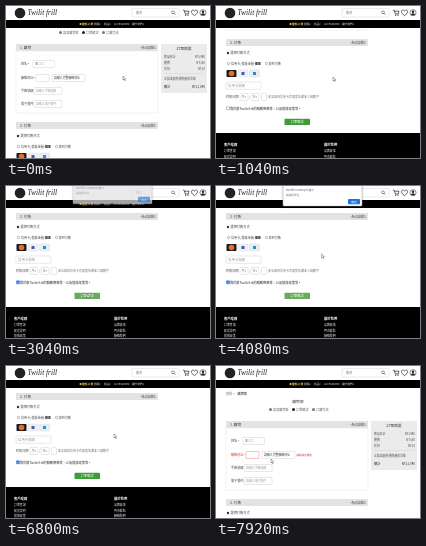
An HTML page with a canvas that plays this animation: 204 by 152 pixels, repeating every 8000 ms.

```html
<!DOCTYPE html>
<html lang="zh-Hant">
<head>
<meta charset="utf-8">
<title>Checkout</title>
<style>
html, body { margin: 0; width: 100%; height: 100%; overflow: hidden; background: #fff; }
canvas { display: block; width: 204px; height: 152px; }
</style>
</head>
<body>
<canvas id="stage"></canvas>
<script>
const W = 204, H = 152, LOOP = 8000;
const SANS = '"Noto Sans CJK TC", "Noto Sans CJK", "Noto Sans", sans-serif';
const SERIF = '"Liberation Serif", "Noto Serif", serif';
const BRAND = 'Twilit frill';
const canvas = document.getElementById('stage');
const ctx = canvas.getContext('2d');
const ratio = window.devicePixelRatio || 1;
canvas.width = W * ratio;
canvas.height = H * ratio;

// Scroll holds each value until the next time.
const scrollSteps = [
  [0, 17], [240, 25], [400, 45], [560, 71], [720, 73], [880, 84], [1040, 100],
  [1200, 106], [6880, 70], [6960, 25], [7040, 4], [7200, 1], [7360, 0]
];
const cursorPath = [
  [0, 117, 70], [1280, 117, 71], [1600, 66, 95], [1840, 36, 118], [2080, 14, 97],
  [2160, 13, 96], [2560, 81, 108], [3680, 81, 108], [4560, 138, 15],
  [4640, 137, 15], [5200, 86, 3], [5520, 84, 4], [5600, 86, 5], [6160, 138, 15],
  [6400, 137, 18], [6800, 108, 68], [7280, 108, 70], [7840, 55, 93], [8000, 55, 93]
];

function held(steps, t) {
  let value = steps[0][1];
  for (const [time, v] of steps) if (t >= time) value = v;
  return value;
}

function along(path, t) {
  let i = 1;
  while (i < path.length - 1 && path[i][0] < t) i++;
  const [t0, x0, y0] = path[i - 1], [t1, x1, y1] = path[i];
  const u = Math.min(1, Math.max(0, (t - t0) / (t1 - t0)));
  const e = u * u * (3 - 2 * u);
  return [x0 + (x1 - x0) * e, y0 + (y1 - y0) * e];
}

const ramp = (t, from, to) => Math.min(1, Math.max(0, (t - from) / (to - from)));

function dialogOpacity(t) {
  if (t < 3040) return 0;
  if (t >= 6160) return 1 - ramp(t, 6160, 6400);
  return 1 - (1 - ramp(t, 2880, 3280)) ** 2;
}

function rect(x, y, w, h, fill) {
  ctx.fillStyle = fill;
  ctx.fillRect(x, y, w, h);
}

function box(x, y, w, h, stroke = '#d0d0d0', fill = '#fff', radius = 0.7, line = 0.5) {
  ctx.beginPath();
  ctx.roundRect(x, y, w, h, radius);
  ctx.fillStyle = fill;
  ctx.fill();
  if (stroke) {
    ctx.strokeStyle = stroke;
    ctx.lineWidth = line;
    ctx.stroke();
  }
}

function circle(x, y, r, fill, stroke) {
  ctx.beginPath();
  ctx.arc(x, y, r, 0, Math.PI * 2);
  if (fill) { ctx.fillStyle = fill; ctx.fill(); }
  if (stroke) { ctx.strokeStyle = stroke; ctx.lineWidth = 0.5; ctx.stroke(); }
}

function text(str, x, y, size = 3.4, color = '#444', align = 'left', weight = 400) {
  ctx.font = `${weight} ${size}px ${SANS}`;
  ctx.fillStyle = color;
  ctx.textAlign = align;
  ctx.textBaseline = 'middle';
  ctx.fillText(str, x, y);
}

function stroke(points, color = '#222', width = 0.7) {
  ctx.beginPath();
  points.forEach(([x, y], i) => i ? ctx.lineTo(x, y) : ctx.moveTo(x, y));
  ctx.strokeStyle = color;
  ctx.lineWidth = width;
  ctx.stroke();
}

function sectionBar(title, y) {
  rect(10, y, 142, 7, '#e3e3e3');
  text(title, 14, y + 3.5, 3.6, '#444');
  text('*為必填欄位', 150, y + 3.5, 2.9, '#444', 'right');
}

function field(label, y, x, w, value, color) {
  text(label, 15, y, 3.1);
  box(x, y - 3.5, w, 7);
  text(value, x + 2, y, 2.9, color);
}

function drawSteps() {
  text('首頁 >', 10, 27.7, 3.1, '#666');
  text('購物車', 21.5, 27.7, 3.2, '#222', 'left', 500);
  text('購物車', 82, 36, 3.8, '#444', 'center');
  ['填寫購物車', '訂單確認', '訂購完成'].forEach((label, i) => {
    const x = [54.5, 77.5, 97.5][i];
    circle(x, 43.5, 1.5, i === 1 ? '#222' : '#777');
    text(label, x + 2.6, 43.5, 3.1, '#666');
  });
}

function drawForm(failed) {
  sectionBar('1. 購物', 55);
  box(10, 62, 142, 62, '#e6e6e6', '#fff', 0);
  field('姓名:*', 75, 27, 21.5, '王○○', '#222');
  const warn = failed ? '#e03030' : '#444';
  text('聯絡地址:*', 15, 89, 3.1, warn);
  box(30, 85.5, 13, 7, failed ? '#f08080' : '#d0d0d0');
  box(46, 85.5, 33, 7);
  text('請輸入完整聯絡地址', 48, 89, 2.9, '#333');
  if (failed) text('請填寫此欄位', 80.5, 89, 2.6, '#e03030');
  field('手機號碼:', 102, 28, 28, '請輸入手機號碼', '#999');
  field('電子郵件:', 115, 28, 28, '請輸入電子郵件', '#999');
}

function drawSummary() {
  rect(155, 55, 46, 49, '#ebebeb');
  text('訂單摘要', 178, 60, 3.8, '#444', 'center');
  [['商品合計', 'NT$980'], ['運費', 'NT$60'], ['折扣', 'NT$0']].forEach(([name, price], i) => {
    const y = 68 + i * 6;
    text(name, 158, y, 2.9, '#444');
    text(price, 199, y, 2.9, '#444', 'right');
  });
  stroke([[158, 84.5], [199, 84.5]], '#cfcfcf', 0.4);
  text('全館滿額免運費優惠活動', 158, 90, 2.9, '#555');
  text('總計', 158, 98, 3.2, '#222', 'left', 500);
  text('NT$1,040', 199, 98, 3, '#222', 'right', 500);
}

function drawPayment(checked, hover) {
  sectionBar('2. 付款', 133);
  circle(12, 147, 1.2, '#333');
  text('選擇付款方式', 14.5, 147, 3.2);

  circle(12.5, 157.5, 1.2, '#fff', '#777');
  text('信用卡/簽帳金融卡', 15, 157.5, 3.1);
  rect(39.5, 156, 2.2, 3, '#555');
  rect(42.3, 156, 2.2, 3, '#555');
  circle(50.5, 157.5, 1.2, '#fff', '#777');
  text('貨到付款', 52.5, 157.5, 3.1);

  box(10.5, 164, 10, 7, null, '#1c1c1c');
  circle(15.5, 167.5, 2.8, '#ee6a1f');
  box(22, 164, 10, 7, '#ddd', '#eef0f6');
  rect(25.5, 166, 3, 3, '#3d5fa5');
  box(33.5, 164, 10, 7, '#ddd', '#e4eef6');
  rect(37, 166, 3, 3, '#2f8cc4');

  box(10, 176, 35, 7.3);
  text('信用卡號碼', 12, 179.7, 3.4, '#999');

  text('有效日期:', 10, 191, 3.1);
  box(24, 187.5, 8, 7);
  text('月▾', 25.5, 191, 2.9, '#777');
  text('/', 33, 191, 3, '#777');
  box(35, 187.5, 8, 7);
  text('年▾', 36.5, 191, 2.9, '#777');
  box(45.5, 187.5, 5, 7);
  text('安全碼為信用卡背面簽名欄末三碼數字', 52, 191, 3, '#777');

  box(10.5, 200.8, 3, 3, checked ? '#1a73e8' : '#777', checked ? '#1a73e8' : '#fff', 0.4);
  if (checked) stroke([[11.1, 202.3], [11.8, 203], [13, 201.4]], '#fff', 0.5);
  text(`我同意${BRAND}的服務條款等，以及退貨政策等。`, 14, 202.4, 3.2, '#222');

  box(68.5, 212.7, 25.5, 6.3, null, hover ? '#69ab5c' : '#3f9b38');
  text('訂單確認', 81.2, 215.8, 3.2, '#fff', 'center');
}

function drawFooter() {
  rect(0, 227, W, 40, '#000');
  const columns = [
    [8, '客戶服務', ['訂單查詢', '配送說明', '退換政策']],
    [108, '關於我們', ['品牌故事', '門市據點', '聯絡我們']]
  ];
  for (const [x, head, items] of columns) {
    text(head, x, 239, 3.3, '#fff', 'left', 700);
    items.forEach((item, i) => text(item, x, 245.3 + i * 5.2, 2.9, '#eee', 'left', 500));
  }
}

function drawHeader() {
  rect(0, 0, W, 22, '#fff');
  circle(14, 7, 5.3, '#222');
  ctx.font = `italic 7.4px ${SERIF}`;
  ctx.fillStyle = '#222';
  ctx.textAlign = 'left';
  ctx.textBaseline = 'middle';
  ctx.fillText(BRAND, 21.5, 7.5);

  box(126, 2.5, 47, 8.5, '#d4d4d4', '#fff', 1);
  text('搜尋', 130, 6.8, 3.1, '#777');
  circle(167, 6.3, 1.4, null, '#333');
  stroke([[168, 7.3], [169.2, 8.5]]);

  stroke([[177, 4.2], [178.2, 4.2], [179.3, 7.9], [182.3, 7.9], [183, 5.2], [178.5, 5.2]]);
  circle(179.6, 9.2, 0.6, '#222');
  circle(182, 9.2, 0.6, '#222');
  ctx.beginPath();
  ctx.moveTo(188.5, 9.7);
  ctx.bezierCurveTo(182.8, 5.6, 186.5, 2.5, 188.5, 5);
  ctx.bezierCurveTo(190.5, 2.5, 194.2, 5.6, 188.5, 9.7);
  ctx.strokeStyle = '#222';
  ctx.lineWidth = 0.7;
  ctx.stroke();
  circle(197, 6.7, 3.1, null, '#222');
  circle(197, 5.7, 1.2, '#222');
  ctx.beginPath();
  ctx.arc(197, 9.3, 2, Math.PI, 0);
  ctx.fill();

  rect(0, 14, W, 8, '#000');
  circle(74.5, 18, 1, '#f1d75b');
  text('最新上架', 76, 18, 2.8, '#f1d75b', 'left', 700);
  [['熱銷▾', 88], ['新品▾', 98], ['ACCESSORY▾', 108], ['關於我們▾', 126]]
    .forEach(([label, x]) => text(label, x, 18, 2.6, '#eee'));
}

function drawDialog(alpha) {
  if (!alpha) return;
  ctx.save();
  ctx.globalAlpha = alpha;
  ctx.translate(0, (alpha - 1) * 6);
  ctx.shadowColor = 'rgba(0,0,0,.35)';
  ctx.shadowBlur = 2 * ratio;
  ctx.shadowOffsetY = 0.4 * ratio;
  box(67, -2, 79, 22, '#ccc', '#fff', 1, 0.4);
  ctx.shadowColor = 'transparent';
  text('twilitfrill.example 顯示', 70, 4.3, 2.7, '#666');
  text('請填寫地址', 70, 9.3, 2.7, '#777');
  box(132, 13, 12, 5.3, null, '#1a73e8', 1);
  text('確定', 138, 15.6, 2.8, '#fff', 'center');
  ctx.restore();
}

function drawCursor(x, y) {
  ctx.beginPath();
  [[0, 0], [0, 4], [0.9, 3.2], [1.6, 4.7], [2.2, 4.4], [1.6, 3], [2.8, 2.9]]
    .forEach(([dx, dy]) => ctx.lineTo(x + dx, y + dy));
  ctx.closePath();
  ctx.fillStyle = '#fff';
  ctx.fill();
  ctx.strokeStyle = '#333';
  ctx.lineWidth = 0.4;
  ctx.stroke();
}

function draw(now) {
  const t = Math.floor((now % LOOP) / 80) * 80;

  ctx.setTransform(ratio, 0, 0, ratio, 0, 0);
  rect(0, 0, W, H, '#fff');
  ctx.save();
  ctx.translate(0, -held(scrollSteps, t));
  drawSteps();
  drawForm(t >= 6400);
  drawSummary();
  drawPayment(t >= 2240, t >= 2560 && t < 6240);
  drawFooter();
  ctx.restore();
  drawHeader();
  drawDialog(dialogOpacity(t));
  drawCursor(...along(cursorPath, t));
}

const start = performance.now();
function tick() {
  draw(performance.now() - start);
  requestAnimationFrame(tick);
}
tick();
</script>
</body>
</html>
```
